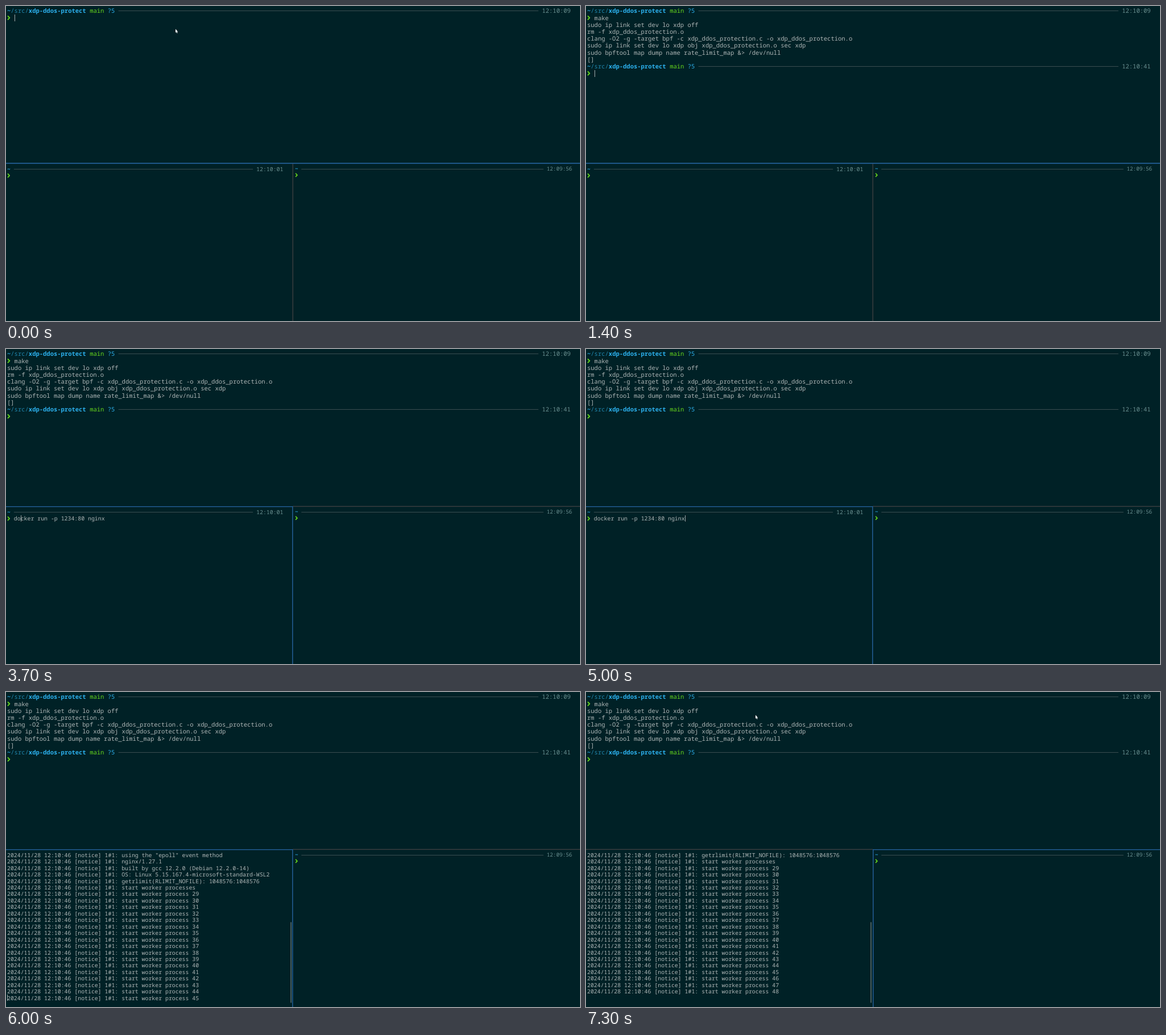
An HTML page for the animation above (8000 ms loop, 1009x555 px).

```html
<!DOCTYPE html>
<html lang="en">
<head>
<meta charset="utf-8">
<title>Terminal panes</title>
<style>
  html, body { margin: 0; width: 100%; height: 100%; overflow: hidden; background: #002126; }
  svg { display: block; }
  text {
    font-family: "Noto Sans Mono", "DejaVu Sans Mono", monospace;
    font-variant-ligatures: none;
    text-rendering: geometricPrecision;
    white-space: pre;
  }
</style>
</head>
<body>
<svg id="stage" width="1009" height="555" viewBox="0 0 1009 555"></svg>
<script>
const LOOP = 8000;
const COLOR = {
  text: '#b0b7b7', path: '#2088b0', anchor: '#2cb1ee', green: '#68da1c',
  time: '#6a8f90', rule: '#3b4d51', cursor: '#a3abab',
  active: '#235e96', idle: '#393c3f', thumb: '#7d8989'
};

// Each item is markup that is visible while from <= time < to.
const items = [];
const show = (from, to, markup) => items.push({ from, to, markup });
const escapeText = s => s.replace(/&/g, '&amp;').replace(/</g, '&lt;').replace(/>/g, '&gt;');
const rect = (x, y, w, h, fill) =>
  `<rect x="${x}" y="${y}" width="${w}" height="${h}" fill="${fill}"/>`;

// A terminal grid: x is the left edge, mid the middle of the first row.
function makePane(x, mid, cell, lineHeight) {
  const size = cell / 0.6;
  const left = col => x + col * cell;
  const middle = row => mid + row * lineHeight;
  const text = (row, col, string, color = COLOR.text, weight = 400) =>
    `<text x="${left(col).toFixed(2)}" y="${(middle(row) + size * 0.352).toFixed(2)}" ` +
    `font-size="${size.toFixed(3)}" font-weight="${weight}" fill="${color}">${escapeText(string)}</text>`;
  const rule = (row, from, to) =>
    rect(left(from), Math.floor(middle(row)), (to - from) * cell, 1, COLOR.rule);
  const chevron = row => {
    const w = cell * 0.52, h = cell * 0.56;
    return `<path d="M${x + 1} ${middle(row) - h}l${w} ${h}l${-w} ${h}" fill="none" ` +
      `stroke="${COLOR.green}" stroke-width="${cell * 0.29}"/>`;
  };
  const cursor = (row, col) =>
    rect(Math.round(left(col)), Math.round(middle(row) - lineHeight / 2), 1, Math.round(lineHeight), COLOR.cursor);
  const lines = (row, list) => list.map((line, i) => text(row + i, 0, line)).join('');
  return { text, rule, chevron, cursor, lines };
}

const top_ = makePane(2, 8.6, 6.31, 12.23);
const left = makePane(2, 287.3, 5.92, 11.45);
const right = makePane(508, 287.1, 5.6, 10.8);

const projectPrompt = (row, time) =>
  top_.text(row, 0, '~', COLOR.anchor, 700) +
  top_.text(row, 1, '/src/', COLOR.path) +
  top_.text(row, 6, 'xdp-ddos-protect', COLOR.anchor, 700) +
  top_.text(row, 23, 'main', COLOR.green, 500) +
  top_.text(row, 28, '?5', COLOR.anchor) +
  top_.rule(row, 31, 148) +
  top_.text(row, 149, time, COLOR.time) +
  top_.chevron(row + 1);

const homePrompt = (pane, timeCol, time) =>
  pane.text(0, 0, '~', COLOR.anchor, 700) +
  pane.rule(0, 2, timeCol - 1) +
  pane.text(0, timeCol, time, COLOR.time) +
  pane.chevron(1);

// Pane borders follow the focus: top, then bottom left, then bottom right.
show(0, 2500, rect(503.5, 278, 1.5, 277, COLOR.idle) + rect(0, 276.3, 1009, 1.8, COLOR.active));
show(2500, 7000, rect(504, 276.6, 505, 1.5, COLOR.idle) +
  rect(0, 277, 504, 1.4, COLOR.active) + rect(503, 277, 1.5, 278, COLOR.active));
show(7000, LOOP, rect(0, 276.6, 504, 1.5, COLOR.idle) +
  rect(504, 277, 505, 1.4, COLOR.active) + rect(504, 277, 1.5, 278, COLOR.active));

// Top pane
show(0, LOOP, projectPrompt(0, '12:10:09'));
show(0, 100, top_.cursor(1, 2));
show(100, LOOP, top_.text(1, 2, 'make'));
show(100, 200, top_.cursor(1, 3));
show(200, 300, top_.cursor(1, 4));
show(300, 600, top_.cursor(1, 5));
show(600, 1000, top_.cursor(1, 6));
show(1000, LOOP, top_.lines(2, [
  'sudo ip link set dev lo xdp off',
  'rm -f xdp_ddos_protection.o',
  'clang -O2 -g -target bpf -c xdp_ddos_protection.c -o xdp_ddos_protection.o',
  'sudo ip link set dev lo xdp obj xdp_ddos_protection.o sec xdp'
]));
show(1000, 1100, top_.cursor(6, 0));
show(1100, LOOP, top_.lines(6, ['sudo bpftool map dump name rate_limit_map &> /dev/null']));
show(1100, 1200, top_.cursor(7, 0));
show(1200, LOOP, top_.text(7, 0, '[]') + projectPrompt(8, '12:10:41'));
show(1200, 1900, top_.cursor(9, 2));

// Bottom left pane: the rest of the command is suggested while it is typed.
show(0, 6000, homePrompt(left, 74, '12:10:01'));
show(2500, 2900, left.cursor(1, 2));
show(3600, 6000, left.text(1, 2, 'docker run -p 1234:80 nginx'));
for (let i = 0; i < 6; i++) show(3600 + i * 100, 3700 + i * 100, left.cursor(1, 3 + i));
show(5000, 5700, left.cursor(1, 29));
show(5700, 5900, left.cursor(2, 0));

const script = '/docker-entrypoint.sh: ';
const folder = '/docker-entrypoint.d/';
const ipv6 = '10-listen-on-ipv6-by-default.sh';
const conf = '/etc/nginx/conf.d/default.conf';
const startup = [
  `${script}${folder} is not empty, will attempt to perform configuration`,
  `${script}Looking for shell scripts in ${folder}`,
  `${script}Launching ${folder}${ipv6}`,
  `${ipv6}: info: Getting the checksum of ${conf}`,
  `${ipv6}: info: Enabled listen on IPv6 in ${conf}`,
  `${script}Sourcing ${folder}15-local-resolvers.envsh`,
  `${script}Launching ${folder}20-envsubst-on-templates.sh`,
  `${script}Launching ${folder}30-tune-worker-processes.sh`,
  `${script}Configuration complete; ready for start up`
].flatMap(line => line.match(/.{1,83}/g));
show(5900, 6000, left.lines(2, startup) + left.cursor(2 + startup.length, 0));

const log = [
  'using the "epoll" event method',
  'nginx/1.27.1',
  'built by gcc 12.2.0 (Debian 12.2.0-14)',
  'OS: Linux 5.15.167.4-microsoft-standard-WSL2',
  'getrlimit(RLIMIT_NOFILE): 1048576:1048576',
  'start worker processes'
];
for (let id = 29; id <= 48; id++) log.push('start worker process ' + id);
const notices = log.map(line => '2024/11/28 12:10:46 [notice] 1#1: ' + line);
show(6000, 6100, left.lines(0, notices.slice(0, 23)) + left.cursor(22, 0));
show(6100, LOOP, left.lines(0, notices.slice(4)));
show(6100, 6400, left.cursor(22, 0));
show(6000, LOOP, rect(500.4, 405.5, 1.2, 142, COLOR.thumb));

// Bottom right pane
show(0, LOOP, homePrompt(right, 79, '12:09:56'));
show(7000, 7300, right.cursor(1, 2));

// Mouse pointer, hidden while typing
const pointer = '<path d="M298 40.5v6.5l1.4-1.2 1 2.2 1.1-.5-1-2.1h1.8z" fill="#fff"/>';
[[0, 100], [2500, 3300], [7000, LOOP]].forEach(([from, to]) => show(from, to, pointer));

const stage = document.getElementById('stage');
let drawn = '';
function frame() {
  const t = performance.now() % LOOP;
  const markup = items.filter(i => t >= i.from && t < i.to).map(i => i.markup).join('');
  if (markup !== drawn) stage.innerHTML = drawn = markup;
  requestAnimationFrame(frame);
}
frame();
</script>
</body>
</html>
```
